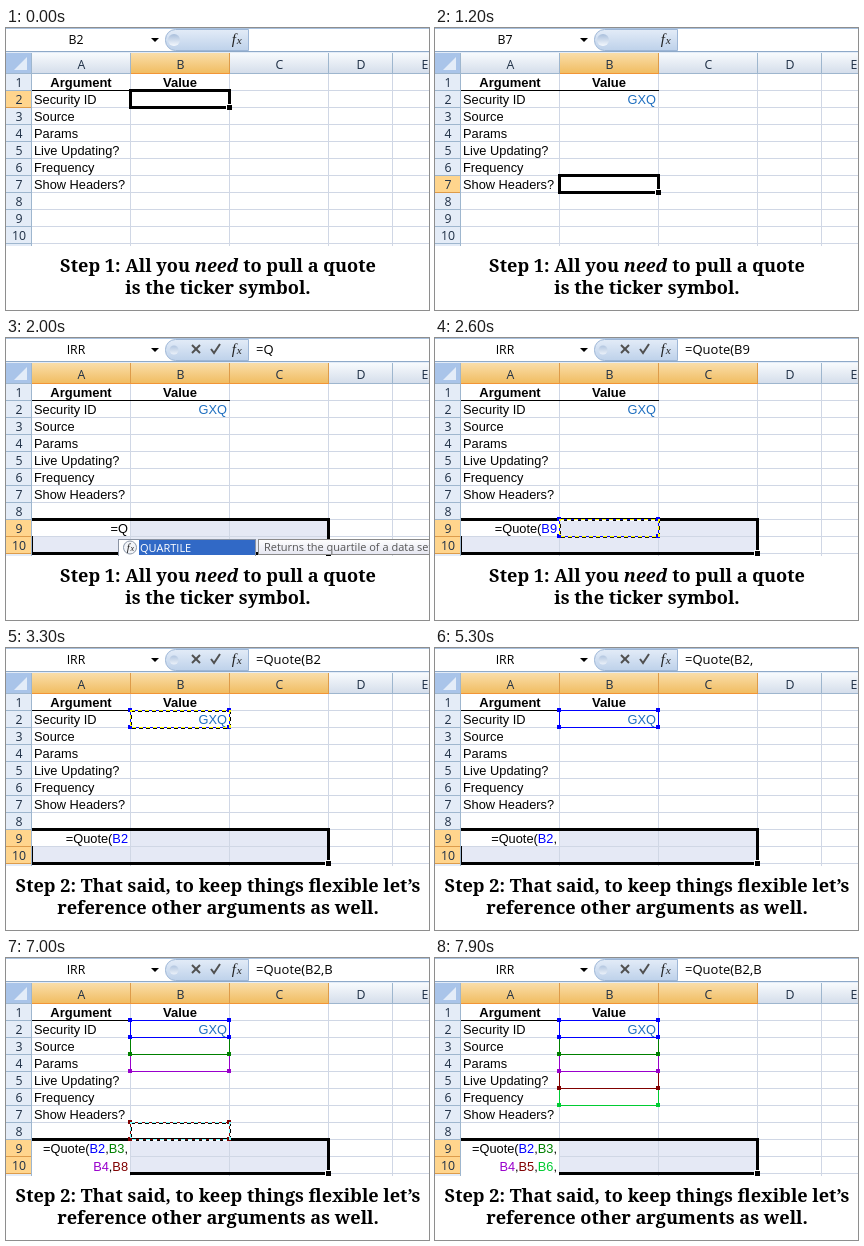
An HTML page with a canvas for the animation above (8000 ms loop, 423 by 282 pixels).

```html
<!DOCTYPE html>
<html lang="en">
<head>
<meta charset="utf-8">
<title>Spreadsheet quote formula</title>
<style>
html, body { margin: 0; width: 100%; height: 100%; overflow: hidden; background: #fff; }
canvas { display: block; }
</style>
</head>
<body>
<canvas id="stage" width="423" height="282"></canvas>
<script>
const ctx = document.getElementById('stage').getContext('2d');
const LOOP = 8000;
const TICKER = 'GXQ';
const CELL = '12.8px "Liberation Sans", Arial, sans-serif';
const CELL_BOLD = 'bold 13px "Liberation Sans", Arial, sans-serif';
const UI = '12.3px "Open Sans", sans-serif';
const UI_BAR = '13px "Open Sans", sans-serif';
const UI_SMALL = '11px "Open Sans", sans-serif';
const CAPTION = 'bold 18.15px "Noto Serif", serif';
const CAPTION_ITALIC = 'italic ' + CAPTION;

const colX = [25, 124, 223, 322, 386, 450];
const rowY = n => 28 + 17 * n;
const labels = ['Security ID', 'Source', 'Params', 'Live Updating?', 'Frequency', 'Show Headers?'];
const argStarts = [2600, 5400, 6200, 6900, 7500];
const argColors = ['#0000ff', '#008000', '#9900cc', '#800000', '#00cc33'];

function rect(x, y, w, h, color) {
  ctx.fillStyle = color;
  ctx.fillRect(x, y, w, h);
}

function frame(x, y, w, h, color, size = 1) {
  rect(x, y, w, size, color);
  rect(x, y + h - size, w, size, color);
  rect(x, y, size, h, color);
  rect(x + w - size, y, size, h, color);
}

function text(str, x, y, font, color = '#000', align = 'left') {
  ctx.font = font;
  ctx.fillStyle = color;
  ctx.textAlign = align;
  ctx.fillText(str, x, y);
}

function path(points, close) {
  ctx.beginPath();
  points.forEach(([x, y]) => ctx.lineTo(x, y));
  if (close) ctx.closePath();
}

function clipped(x, y, w, h, paint) {
  ctx.save();
  ctx.beginPath();
  ctx.rect(x, y, w, h);
  ctx.clip();
  paint();
  ctx.restore();
}

function gradient(y0, y1, ...colors) {
  const g = ctx.createLinearGradient(0, y0, 0, y1);
  colors.forEach((c, i) => g.addColorStop(i / (colors.length - 1), c));
  return g;
}

// Columns are 0-based, rows 1-based; the box includes its border lines.
function cellBox(c0, r0, c1 = c0, r1 = r0) {
  const x = colX[c0], y = rowY(r0);
  return { x, y, w: colX[c1 + 1] - x + 1, h: rowY(r1 + 1) - y + 1 };
}

function stateAt(t) {
  const step = Math.floor(t / 100);
  const s = { c0: 1, r0: 2, c1: 1, r1: 2, name: 'B2', ticker: '', bar: '', formula: '', args: [] };
  s.ticker = TICKER.slice(0, Math.max(0, step - 4));
  if (step < 8) {
    s.bar = s.ticker;
  } else if (step < 15) {
    s.r0 = s.r1 = step - 5;
    s.name = 'B' + s.r0;
  } else {
    s.c0 = 0;
    s.c1 = Math.min(2, step - 15);
    s.r0 = 9;
    s.r1 = step < 18 ? 9 : 10;
    s.name = step < 16 ? 'A9' : `${s.r1 - 8}R x ${s.c1 + 1}C`;
  }
  if (step >= 19) {
    s.name = 'IRR';
    s.formula = '=Quote('.slice(0, step - 18);
    s.args = argStarts.filter(start => t >= start).map((start, i) => ({
      row: Math.max(i + 2, 9 - Math.floor((t - start) / 100)),
      done: t >= (argStarts[i + 1] || LOOP) - 100,
      color: argColors[i]
    }));
    s.bar = s.formula + s.args.map(a => 'B' + a.row + (a.done ? ',' : '')).join('');
  }
  return s;
}

function drawFormulaBar(s) {
  rect(0, 0, 423, 25, '#fff');
  rect(0, 0, 423, 1, '#a9c1de');
  rect(0, 23, 423, 1, '#8ea9c8');
  rect(0, 24, 423, 1, '#e3ecf8');
  text(s.name, 70, 16, UI, '#000', 'center');
  ctx.fillStyle = '#000';
  path([[145, 10], [153, 10], [149, 14]], true);
  ctx.fill();

  ctx.fillStyle = gradient(2, 23, '#e2ebf7', '#bdd1ea');
  ctx.strokeStyle = '#9db6d6';
  ctx.lineWidth = 1;
  ctx.beginPath();
  ctx.roundRect(159.5, 1.5, 83, 21, [10, 0, 0, 10]);
  ctx.fill();
  ctx.stroke();
  ctx.fillStyle = gradient(6, 18, '#a9bfdc', '#f4f8fd');
  ctx.beginPath();
  ctx.arc(168, 12, s.bar ? 4.5 : 6, 0, 7);
  ctx.fill();
  if (s.bar) {
    ctx.strokeStyle = '#505050';
    ctx.lineWidth = 2;
    path([[186, 7], [194, 15]]);
    ctx.stroke();
    path([[194, 7], [186, 15]]);
    ctx.stroke();
    path([[205, 11], [208, 15], [214, 6]]);
    ctx.stroke();
  }
  drawFx(230, 16, 15);
  clipped(247, 1, 79, 22, () => text(s.bar, 250, 16, UI_BAR));
}

function drawFx(x, y, size) {
  text('f', x - size * 0.15, y, `italic ${size}px "Liberation Serif", serif`, '#222', 'center');
  text('x', x + size * 0.22, y, `italic ${size * 0.75}px "Liberation Serif", serif`, '#222', 'center');
}

function drawHeaders(s) {
  const plain = gradient(26, 45, '#f6f9fc', '#d5deeb');
  const active = gradient(26, 45, '#f9dca6', '#f1bd62');
  rect(0, 25, 25, 20, '#a9c4e9');
  ctx.fillStyle = '#e3ecf8';
  path([[21, 29], [21, 42], [8, 42]], true);
  ctx.fill();
  for (let c = 0; c < 5; c++) {
    const on = c >= s.c0 && c <= s.c1;
    const x = colX[c] + 1, w = colX[c + 1] - colX[c];
    rect(x, 25, w, 20, on ? active : plain);
    rect(x + w - 1, 25, 1, 20, on ? '#dd9b4a' : '#9eb6ce');
    text('ABCDE'[c], x + w / 2, 41, UI, '#1e2f45', 'center');
  }
  rect(0, 45, 423, 1, '#9eb6ce');
  for (let r = 1; r <= 11; r++) {
    const on = r >= s.r0 && r <= s.r1;
    const y = rowY(r) + 1;
    rect(0, y, 25, 17, on ? '#ffd58d' : '#e4ecf7');
    rect(0, y + 16, 25, 1, on ? '#dd9b4a' : '#9eb6ce');
    if (r < 11) text(r, 13, y + 13, UI, '#1e2f45', 'center');
  }
  rect(25, 25, 1, 193, '#9eb6ce');
  for (let c = s.c0; c <= s.c1; c++) rect(colX[c] + 1, 45, colX[c + 1] - colX[c], 1, '#f29536');
}

function drawGrid(s) {
  rect(26, 46, 397, 172, '#fff');
  if (s.c1 > s.c0) {
    const b = cellBox(s.c0, s.r0, s.c1, s.r1);
    rect(b.x, b.y, b.w, b.h, '#e5e9f5');
    const a = cellBox(0, 9);
    rect(a.x, a.y, a.w, a.h, '#fff');
  }
  for (let c = 1; c < 5; c++) rect(colX[c], 46, 1, 172, '#d0d7e5');
  for (let r = 2; r <= 11; r++) rect(26, rowY(r), 397, 1, '#d0d7e5');
  rect(26, 62, 198, 1, '#000');
  text('Argument', 75, 59, CELL_BOLD, '#000', 'center');
  text('Value', 174, 59, CELL_BOLD, '#000', 'center');
  labels.forEach((label, i) => text(label, 28, 76 + 17 * i, CELL));
  text(s.ticker, 221, 76, CELL, '#1f6fc0', 'right');
}

function drawSelection(s) {
  const b = cellBox(s.c0, s.r0, s.c1, s.r1);
  clipped(26, 46, 397, 172, () => {
    frame(b.x - 1, b.y - 1, b.w + 2, b.h + 2, '#000', 3);
    const x = b.x + b.w - 4, y = b.y + b.h - 4;
    rect(x, y, 6, 6, '#fff');
    rect(x + 1, y + 1, 5, 5, '#000');
  });
}

function drawTokens(tokens, y) {
  let x = 122;
  for (const [str, color] of tokens.slice().reverse()) {
    text(str, x, y, CELL, color, 'right');
    x -= ctx.measureText(str).width;
  }
}

function drawCellFormula(s) {
  if (!s.formula) return;
  const tokens = args => args.flatMap(a => [['B' + a.row, a.color], [a.done ? ',' : '', '#000']]);
  const wrapped = s.args.length > 2;
  rect(26, 183, 98, wrapped ? 35 : 15, '#fff');
  drawTokens([[s.formula, '#000'], ...tokens(s.args.slice(0, 2))], 195);
  if (wrapped) drawTokens(tokens(s.args.slice(2)), 213);
}

// Marching ants invert whatever lies beneath them.
function drawAnts(b) {
  ctx.save();
  ctx.globalCompositeOperation = 'difference';
  ctx.strokeStyle = '#fff';
  ctx.lineWidth = 2;
  ctx.setLineDash([4, 3]);
  ctx.strokeRect(b.x + 1, b.y + 1, b.w - 1, b.h - 1);
  ctx.restore();
}

function drawReferences(s) {
  for (const a of s.args.slice().reverse()) {
    const b = cellBox(1, a.row);
    frame(b.x, b.y, b.w, b.h, a.color);
    for (const x of [b.x, b.x + b.w - 1])
      for (const y of [b.y, b.y + b.h - 1]) rect(x - 2, y - 2, 4, 4, a.color);
  }
  s.args.filter(a => !a.done).forEach(a => drawAnts(cellBox(1, a.row)));
}

function drawSuggestion(s) {
  const n = s.formula.length;
  if (n < 2 || n > 6) return;
  const builtIn = n < 4;
  rect(112, 201, 138, 17, '#fff');
  frame(112, 201, 138, 20, '#8a93a3');
  rect(133, 202, 116, 15, '#3169c6');
  ctx.fillStyle = '#f2f4f8';
  ctx.strokeStyle = '#8c98aa';
  ctx.lineWidth = 1;
  ctx.beginPath();
  ctx.arc(124, 209.5, 6.5, 0, 7);
  ctx.fill();
  ctx.stroke();
  drawFx(124, 213, 11);
  text(builtIn ? 'QUARTILE' : 'Quote', 134, 214, UI_SMALL, '#fff');
  if (builtIn) {
    rect(252, 201, 171, 16, gradient(201, 217, '#fff', '#e4e5f0'));
    frame(252, 201, 180, 16, '#8a8a8a');
    text('Returns the quartile of a data set', 258, 213, UI_SMALL, '#555');
  }
}

function drawCaption(t) {
  rect(0, 218, 423, 64, '#fff');
  if (t >= 3300) {
    text('Step 2: That said, to keep things flexible let’s', 212, 244, CAPTION, '#000', 'center');
    text('reference other arguments as well.', 212, 266, CAPTION, '#000', 'center');
    return;
  }
  const runs = [['Step 1: All you ', CAPTION], ['need', CAPTION_ITALIC], [' to pull a quote', CAPTION]];
  const width = ([str, font]) => {
    ctx.font = font;
    return ctx.measureText(str).width;
  };
  let x = 212 - runs.reduce((sum, run) => sum + width(run), 0) / 2;
  for (const run of runs) {
    text(run[0], x, 244, run[1]);
    x += width(run);
  }
  text('is the ticker symbol.', 212, 266, CAPTION, '#000', 'center');
}

function draw(t) {
  const s = stateAt(t);
  drawFormulaBar(s);
  drawGrid(s);
  drawHeaders(s);
  drawSelection(s);
  drawCellFormula(s);
  drawReferences(s);
  drawSuggestion(s);
  drawCaption(t);
}

function tick() {
  draw(performance.now() % LOOP);
  requestAnimationFrame(tick);
}
tick();
</script>
</body>
</html>
```
